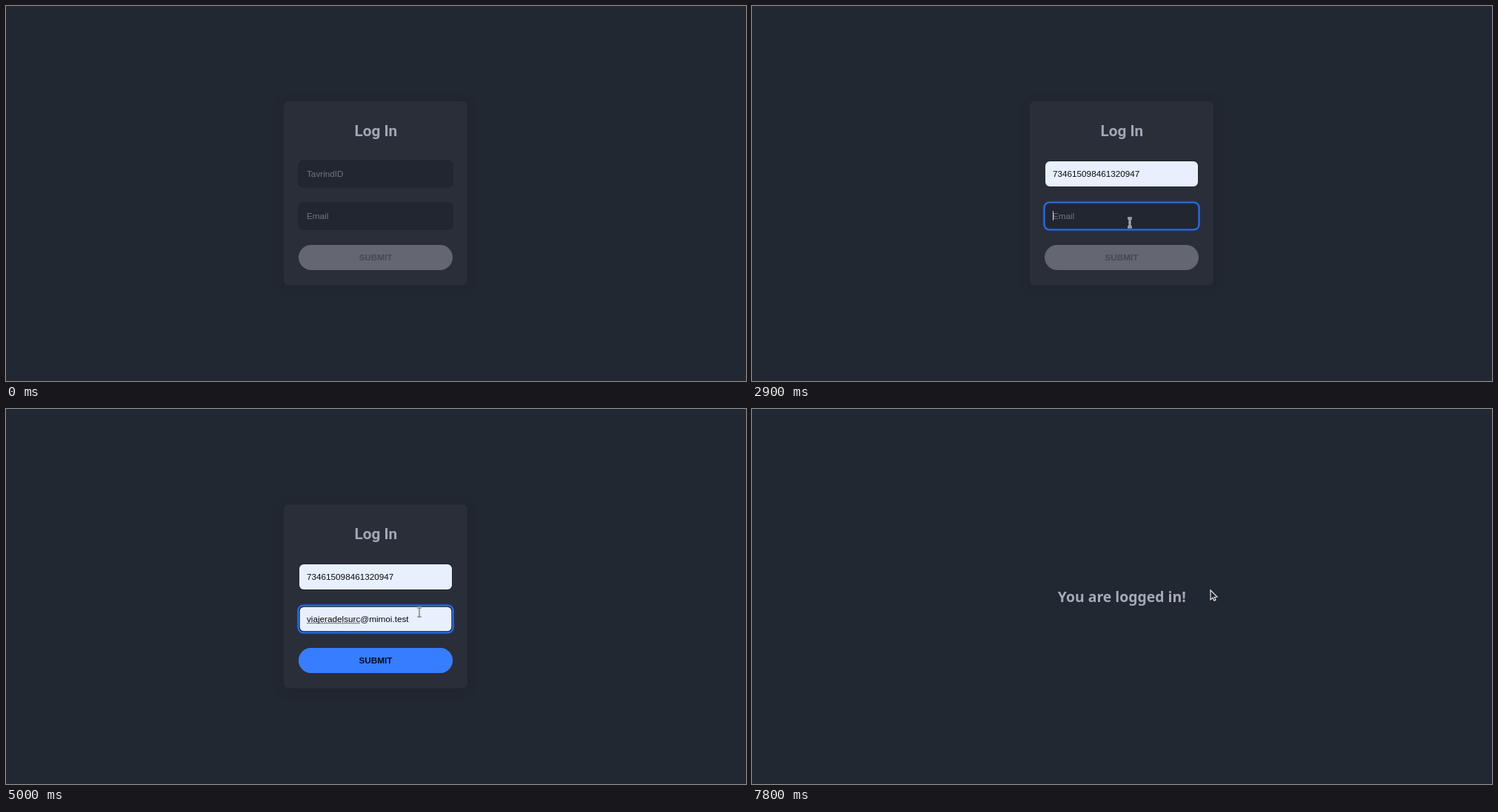
Recreate the animation shown at these times as an HTML page with a canvas. Size 999 by 507 pixels, loop 8 s.

```html
<!DOCTYPE html>
<html lang="en">
<head>
<meta charset="utf-8">
<title>Log In</title>
<style>
  html, body { margin: 0; width: 100%; height: 100%; overflow: hidden; background: #222831; }
  canvas { display: block; }
</style>
</head>
<body>
<canvas id="stage" width="999" height="507"></canvas>
<script>
const ctx = document.getElementById('stage').getContext('2d');
const LOOP = 8000;
const SANS = '"Liberation Sans", Arial, sans-serif';
const INPUT_FONT = `11.72px ${SANS}`;
const ID_TEXT = '734615098461320947';
const MAIL_USER = 'viajeradelsurc';
const MAIL_TEXT = MAIL_USER + '@mimoi.test';

// Pointer stops: time, x, y, shape from that time on
const POINTER = [
  [700, 508, 231, 'beam'],
  [800, 512, 234, 'beam'],
  [1100, 536, 264, 'arrow'],
  [2000, 536, 264, 'arrow'],
  [2300, 510, 293, 'beam'],
  [3400, 510, 293, 'beam'],
  [3500, 527, 314, 'arrow'],
  [4000, 527, 314, 'arrow'],
  [4100, 531, 321, 'beam'],
  [4400, 531, 321, 'beam'],
  [5000, 558, 275, 'beam'],
  [5900, 558, 275, 'beam'],
  [6100, 544, 327, 'hand'],
  [6200, 541, 337, 'hand'],
  [6800, 537, 331, 'arrow'],
  [7500, 537, 331, 'arrow'],
  [7800, 619, 245, 'arrow'],
  [LOOP, 619, 245, 'arrow']
];

const within = (t, from, to) => t >= from && t < to;
const ramp = (t, from, span) => Math.min(1, Math.max(0, (t - from) / span));

function box(x, y, w, h, r) {
  ctx.beginPath();
  ctx.roundRect(x, y, w, h, r);
}

function label(text, x, y, font, color, align = 'left') {
  ctx.font = font;
  ctx.fillStyle = color;
  ctx.textAlign = align;
  ctx.fillText(text, x, y);
}

function trace(points, close) {
  ctx.beginPath();
  points.forEach(([x, y], i) => i ? ctx.lineTo(x, y) : ctx.moveTo(x, y));
  if (close) ctx.closePath();
}

function stroke(color, width) {
  ctx.strokeStyle = color;
  ctx.lineWidth = width;
  ctx.stroke();
}

function drawCard() {
  ctx.save();
  ctx.shadowColor = 'rgba(28, 28, 38, .4)';
  ctx.shadowBlur = 13;
  ctx.shadowOffsetY = 2;
  ctx.fillStyle = '#2a2e39';
  box(375, 129, 248, 248.5, 6);
  ctx.fill();
  ctx.restore();
  label('Log In', 499.3, 176, '700 20.8px Roboto, sans-serif', '#a2a7b6', 'center');
}

function drawField(y, { placeholder, value, filled, focus, caret, misspelt }) {
  const baseline = y + 21.5;
  ctx.fillStyle = '#212630';
  box(395, y, 208, 36, 6);
  ctx.fill();
  if (!filled) stroke('#20232d', 1);
  if (focus > 0) {
    ctx.globalAlpha = focus;
    box(394.5, y - .5, 209, 37, 7);
    stroke('rgba(22, 68, 158, .6)', 4);
    stroke('#3479ee', 1.6);
    ctx.globalAlpha = 1;
  }
  if (filled) {
    ctx.fillStyle = focus === 1 ? '#15213c' : '#e8f0fe';
    box(396, y + 1, 206, 34, 6);
    ctx.fill();
    ctx.fillStyle = '#e8f0fe';
    box(396.7, y + 1.7, 204.6, 32.6, 5.5);
    ctx.fill();
  }
  label(filled ? value : placeholder, 406, baseline, INPUT_FONT, filled ? '#080a10' : '#73757b');
  if (misspelt) {
    const end = 406 + ctx.measureText(MAIL_USER).width;
    const wave = [];
    for (let x = 406; x <= end; x += 1.5) wave.push([x, baseline + (wave.length % 2 ? 2.6 : 1.4)]);
    trace(wave);
    stroke('#30323a', .8);
  }
  if (caret) {
    const x = filled ? 406.3 + ctx.measureText(value).width : 406;
    ctx.fillStyle = filled ? '#05070c' : '#c4c7cd';
    ctx.fillRect(x, y + 11, 1, 13);
  }
}

function drawButton(active) {
  ctx.globalAlpha = 1;
  ctx.fillStyle = '#64676f';
  box(395, 323, 208, 34, 17);
  ctx.fill();
  ctx.globalAlpha = active;
  ctx.fillStyle = '#377dff';
  ctx.fill();
  ctx.globalAlpha = 1;
  label('SUBMIT', 499, 344, `700 11.75px ${SANS}`, active > .5 ? '#070b14' : '#454952', 'center');
}

const SHAPES = {
  arrow() {
    trace([[0, 0], [0, 12.8], [3, 10.2], [5, 14.3], [7, 13.3], [5.2, 9.4], [9, 9]], true);
    ctx.fillStyle = '#20232b';
    ctx.fill();
    stroke('#e6e8ec', 1.2);
  },
  beam() {
    ctx.beginPath();
    for (const s of [-1, 1]) {
      ctx.moveTo(-2.8, 6 * s);
      ctx.lineTo(2.8, 6 * s);
    }
    ctx.moveTo(0, -6);
    ctx.lineTo(0, 6);
    stroke('#e3e5e9', 2.8);
    stroke('#50535b', .9);
  },
  hand() {
    ctx.beginPath();
    ctx.moveTo(-2.6, 1);
    ctx.lineTo(-2.6, -5.5);
    ctx.quadraticCurveTo(-1.5, -7.5, -.4, -5.5);
    ctx.lineTo(-.4, -2);
    ctx.lineTo(4.5, -1);
    ctx.quadraticCurveTo(6, -.5, 5.8, 1.5);
    ctx.lineTo(4.2, 6.5);
    ctx.lineTo(-1.8, 6.5);
    ctx.lineTo(-5.2, 1.6);
    ctx.quadraticCurveTo(-4.8, -.5, -2.6, 1);
    ctx.closePath();
    ctx.fillStyle = '#f3f4f6';
    ctx.fill();
    stroke('#22283a', 1);
  }
};

function drawPointer(t) {
  if (t < 800) return;
  const i = POINTER.findIndex((stop, n) => n + 1 === POINTER.length || POINTER[n + 1][0] > t);
  const [t0, x0, y0, shape] = POINTER[i];
  const [t1, x1, y1] = POINTER[i + 1];
  const k = (t - t0) / (t1 - t0);
  const ease = k * k * (3 - 2 * k);
  ctx.save();
  ctx.translate(x0 + (x1 - x0) * ease, y0 + (y1 - y0) * ease);
  SHAPES[shape]();
  ctx.restore();
}

function draw(t) {
  ctx.fillStyle = '#222831';
  ctx.fillRect(0, 0, 999, 507);
  if (t < 6700) {
    drawCard();
    drawField(209, {
      placeholder: 'TavrindID',
      value: ID_TEXT,
      filled: t >= 1000,
      focus: t < 2700 ? ramp(t, 0, 200) : 1 - ramp(t, 2600, 200),
      caret: within(t, 200, 800) || within(t, 1700, 2100)
    });
    drawField(266, {
      placeholder: 'Email',
      value: MAIL_TEXT,
      filled: t >= 3500,
      focus: ramp(t, 2600, 200),
      caret: within(t, 2900, 3500) || within(t, 4100, 5000) || within(t, 5600, 6000),
      misspelt: t >= 4100
    });
    drawButton(ramp(t, 3600, 200));
  } else {
    label('You are logged in!', 499.3, 260.5, '700 19.4px "Noto Sans", sans-serif', '#a5aaba', 'center');
  }
  drawPointer(t);
}

const start = performance.now();
function tick() {
  const t = (performance.now() - start) % LOOP;
  draw(Math.floor(t / 100) * 100);
  requestAnimationFrame(tick);
}
tick();
</script>
</body>
</html>
```
